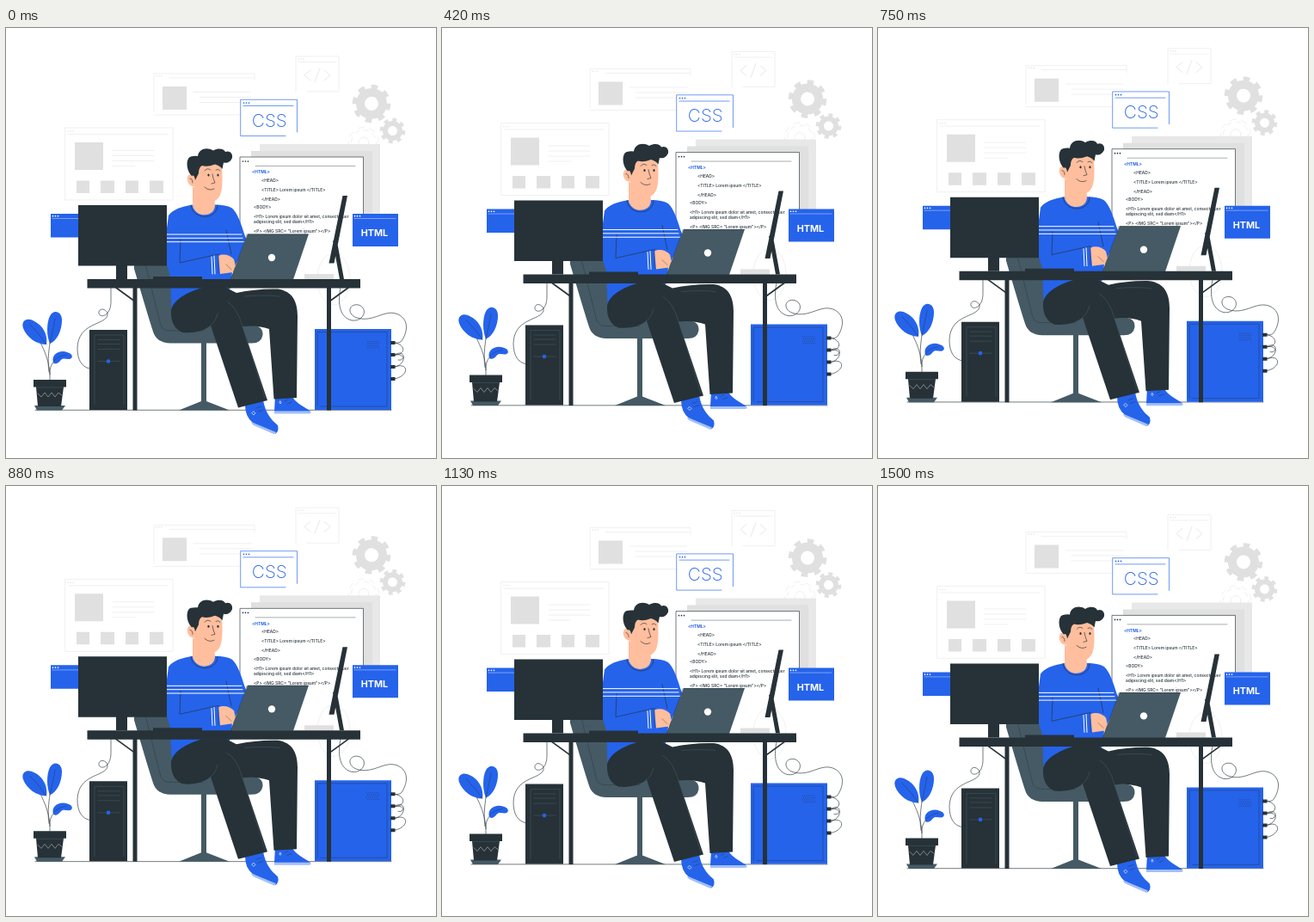
Recreate the animation shown at these times as an HTML page. Size 500 px wide and 500 px high, loop 1540 ms.

```html
<!DOCTYPE html>
<html lang="en">
<head>
<meta charset="utf-8">
<title>Developer at a desk</title>
<style>
  html, body { margin: 0; width: 100%; height: 100%; overflow: hidden; background: #fff; }
  svg { display: block; width: 100vw; height: 100vh; font-family: Inter, "Open Sans", sans-serif; }
  .blue { fill: #2563eb; }
  .dark { fill: #263238; }
  .slate { fill: #455a64; }
  .grey { fill: #e0e0e0; }
  .skin { fill: #ffbe9d; }
  .white { fill: #fff; }
  .line { fill: none; stroke: #263238; stroke-width: .65; stroke-linecap: round; stroke-linejoin: round; }
  .pale { stroke: #e8e8e8; }
  .royal { stroke: #2563eb; }
  .snow { stroke: #fff; }
  .steel { stroke: #56676f; }
  .thin { stroke-width: .4; }
  .firm { stroke-width: 1; }
  .bold { stroke-width: 1.7; }
  .dots { stroke-width: 1.7; stroke-dasharray: 0 3; }
  .code { font-size: 4.9px; font-weight: 500; fill: #263238; white-space: pre; }
</style>
</head>
<body>
<svg viewBox="0 0 500 500">
<g id="scene">
  <!-- pale windows -->
  <g class="line pale">
    <path d="M172 98V53H289V61M172 101H284M190 58H288M218 74.500H285M225 80.500H285M225 86.500H285"/>
    <path d="M69 116H194V200H69ZM72 123.500H188M124 142.500H172M124 148.500H172M124 154.500H172M124 160.500H150"/>
    <path d="M337 74V33H387V74H350M340 39.500H384"/>
    <path class="dots" d="M175 55.500H182M72 120H79M340 36H347"/>
    <path class="firm" d="M354 49L347 55L354 61M370 49L377 55L370 61M365 47L359 63"/>
  </g>
  <path class="grey" d="M182 68H210V95H182ZM80 133H113V165H80ZM82 177.500H97V192H82ZM110 177.500H126V192H110ZM139 177.500H154V192H139ZM167 177.500H183V192H167Z"/>

  <!-- gears -->
  <g fill="none" stroke="#e0e0e0">
    <g transform="rotate(10 425 88)">
      <circle cx="425" cy="88" r="13" stroke-width="10"/>
      <circle cx="425" cy="88" r="19.500" stroke-width="5.500" pathLength="8" stroke-dasharray=".5" stroke-dashoffset=".25"/>
    </g>
    <g transform="rotate(10 449.500 119.500)">
      <circle cx="449.500" cy="119.500" r="8.500" stroke-width="6"/>
      <circle cx="449.500" cy="119.500" r="12.800" stroke-width="4" pathLength="8" stroke-dasharray=".5" stroke-dashoffset=".25"/>
    </g>
  </g>
  <g class="line pale">
    <circle cx="416" cy="133" r="14.500" pathLength="8" stroke-dasharray=".5"/>
    <circle cx="416" cy="133" r="17.500" pathLength="8" stroke-dasharray=".5" stroke-dashoffset=".5"/>
    <circle cx="416" cy="133" r="6"/>
  </g>

  <!-- markup window -->
  <path fill="#e8e8e8" d="M295 135H435V250H295Z"/>
  <path class="grey" d="M285 143H426V250H285Z"/>
  <path class="white" d="M272 150H415.500V267H272Z"/>
  <path class="line" d="M272 267V150H415.500V216"/>
  <path class="line thin" d="M290 160.500H406"/>
  <path class="line dots" d="M275.500 155H283"/>
  <g class="code">
    <text x="286" y="169.500" class="blue" font-weight="700">&lt;HTML&gt;</text>
    <text x="297" y="179">&lt;HEAD&gt;</text>
    <text x="297" y="190">&lt;TITLE&gt; Lorem ipsum &lt;/TITLE&gt;</text>
    <text x="297" y="201">&lt;/HEAD&gt;</text>
    <text x="288" y="210.500">&lt;BODY&gt;</text>
    <text x="288" y="221.500">&lt;H1&gt; Lorem ipsum dolor sit amet, consectetuer</text>
    <text x="288" y="227.500">adipiscing elit, sed diam&lt;/H1&gt;</text>
    <text x="288" y="238.500">&lt;P&gt; &lt;IMG SRC= "Lorem ipsum"&gt;&lt;/P&gt;</text>
  </g>
  <ellipse class="line pale" cx="381" cy="292" rx="19" ry="30"/>
  <path class="grey" d="M347 286H381V292H347Z"/>

  <!-- small blue windows -->
  <path class="white" d="M273 83H338.500V125.500H273Z"/>
  <path class="line royal" d="M325 125.500H272.700V83.300H338.500V121M276 90.500H334"/>
  <path class="line royal dots" d="M276.500 87H283"/>
  <text class="blue" x="306.300" y="114.700" font-size="20.800" font-weight="250" text-anchor="middle">CSS</text>
  <path class="blue" d="M52 216H86V243.500H52ZM403 216H456V254H403Z"/>
  <path class="line snow thin" d="M54 221.500H84M405 221.500H453"/>
  <path class="line snow dots" d="M54.500 218.700H61M405.500 218.700H412"/>
  <text class="white" x="428.500" y="242" font-size="10.800" font-weight="700" text-anchor="middle">HTML</text>

  <path class="line" d="M34 444.300H448"/>

  <!-- plant -->
  <path class="line" d="M51 409C52 386 42 368 28 345M50 400C47 382 52 360 57 336M51 403C50 390 58 383 70 381"/>
  <g class="blue">
    <path d="M47 368C36 368 24 360 20 349C17 340 25 336 33 341C43 346 49 357 47 368Z"/>
    <path d="M51 367C47 358 47 343 51 335C55 327 65 329 65 340C65 352 59 364 51 367Z"/>
    <path d="M55 389C52 379 63 374 71 377C79 379 78 385 73 385C69 385 66 383 63 387C60 391 56 391 55 389Z"/>
  </g>
  <path class="line thin" d="M47 368Q40 357 28 345M51 367Q55 350 57 338M55 388Q60 381 70 380"/>
  <path class="slate" d="M33 439H69L65 444.500H36Z"/>
  <path class="dark" d="M32 409H70V417.500H67L64 440H37L35 417.500H32Z"/>
  <path class="line steel thin" d="M35 418H67"/>
  <path class="line snow thin" d="M37 425L41 429L45 424L49 429L53 424L57 429L61 424L65 427"/>

  <!-- towers and cables -->
  <path class="line" d="M122 302V318C122 337 107 338 108 330C110 324 119 328 118 334C115 346 84 342 83 372C83 386 88 394 97 396"/>
  <path class="dark" d="M97 351H141V444H97Z"/>
  <path class="line steel thin" d="M103 438V357H137V438M107 362.500H132M107 367.500H132M107 373.500H132M107 387.500H132"/>
  <circle class="blue" cx="119" cy="387.500" r="2.300"/>
  <path class="blue" d="M359 350H448V444H359Z"/>
  <path class="line thin" d="M362 440V353.500H443V440H366"/>
  <path class="line" stroke-dasharray="0 2.200" d="M419.500 364.500H434M420.500 367H434M419.500 369.500H434M420.500 372H434"/>
  <path class="line" d="M389 302C386 316 386 336 402 340C416 342 422 326 410 322C398 320 396 333 408 337C428 343 440 326 456 333C470 340 466 355 460 364Q457 367 452 366M452 366C465 368 465 380 452 380C466 372 466 392 452 394M452 380C465 378 463 388 456 386M452 394C468 388 470 404 452 408"/>
  <path class="dark" d="M447 364H452.500V368H447ZM447 378H452.500V382H447ZM447 392H452.500V396H447ZM447 406H452.500V410H447Z"/>

  <!-- chair -->
  <path class="slate" d="M227 364H233V434L260 444.500H201L227 434Z"/>
  <path class="slate" d="M149 274H200V346H288Q299 347 298.500 357Q297 366.500 286 366.500H191Q175 366 171 353Q166 338 149 280Z"/>
  <path class="line thin" d="M162 274L180 346Q183 352 190 352H230"/>

  <!-- sweater -->
  <path class="blue" d="M217 205.500C203 208 194 211 189 218L183 262L191 289L192.500 328H240L262 301L263 282L281 250C276 238 271 215 262 209Q256 205.500 243 205.500Z"/>
  <path class="line" d="M203 246L202 273L247 263M256 235L262 263M215 206C217 224 246 224 246 206"/>
  <path class="line snow firm" d="M187 240H274M187 244.300H275M186 248.700H277M239 266L240 286M242 265L243 286"/>
  <path class="skin" d="M247 265C253 262 261 264 265 269Q268 278 264 284L249 286Z"/>
  <path class="line thin" d="M247 264V285M256 275L262 281"/>

  <!-- shoes and legs -->
  <path class="blue" d="M278 438L299 433C302 448 308 455 316 462Q318 469 313 472L287 459Q278 452 278 438Z"/>
  <path fill="#a3bff7" d="M285 458L314 470Q313 473 311 472L288 462Q285 460 285 458ZM312 445.500H354Q356 448 352 448.500H312Z"/>
  <path class="blue" d="M313 428L332 427C336 436 345 439 354 445.500H312Z"/>
  <path class="line snow" d="M288 446L290 448L288 450L286 448ZM319 434L320 436L319 437L318 436Z"/>
  <path class="line thin" d="M291 442L297 440M293 446L299 444M324 434L328 432M327 437L332 435"/>
  <path class="dark" d="M192 328C196 314 212 307 228 302H256L268 308C284 304.500 300 303 316 303.500C333 306 339 318 339 335L338 430L311.500 431.500L306 350Q292 345 275 347L304 433L270 441.500L238 346Q225 356 205 354Q191 348 192 328Z"/>
  <path class="line steel thin" d="M257 318Q269 324 276 350L301 430M278 312Q300 310 318 312M238 346Q244 341 246 332"/>

  <!-- head -->
  <path class="skin" d="M217 184V207C221 222 244 220 243 205L242 197Z"/>
  <path class="skin" d="M222 154H250C252 168 252 184 250 191C247 203 237 204 229 199Q221 194 219 184C211 185 208 172 214 170Q220 169 221 174Z"/>
  <path class="dark" d="M216 172C209 165 209 151 215 149.500Q219 148.500 223 149C224 140 234 138 241 142.500C248 138.500 254 141 255 144C260 142 264 146 263 151Q260 158 253 156.500L251.500 164Q249 160 243 158.500Q234 162 228 160Q224 162 224 169L220 177Q219 170 216 172Z"/>
  <path class="line" d="M231 166Q234 162 238 165M244 165Q247 163 249 166M240 170Q241 176 243 180L239 181M231 185Q236 190 242 187M214 175Q217 175 217 180"/>
  <g class="dark"><ellipse cx="235.500" cy="171" rx="1.100" ry="1.500"/><ellipse cx="246.500" cy="171" rx="1.100" ry="1.500"/></g>

  <!-- desk -->
  <path class="dark" d="M84 206H187V276.500H141V292H128V276.500H84ZM171 289H228V293H171Z"/>
  <path class="slate" d="M281 239.500H352L334 292.500H261Z"/>
  <path class="line thin" d="M280 240L261.500 292M281 240H351"/>
  <circle class="white" cx="309" cy="267" r="4.200"/>
  <path class="dark" d="M391.500 195H397L381.500 273.500H375.500ZM380 248L384 243L393 292H388Z"/>
  <path class="dark" d="M94.500 292H412V302.500H94.500ZM147.500 302H152.500V444.500H147.500ZM373 302H378V444.500H373Z"/>
  <path class="line bold" d="M128 302L150 318M398 302L376 318"/>
</g>
</svg>
<script>
  const PERIOD = 1540, TOP_TIME = 735, RISE = 10;
  const scene = document.getElementById("scene");

  // Linear float: the whole scene rises to TOP_TIME, then sinks back.
  function lift(ms) {
    const away = Math.abs(ms % PERIOD - TOP_TIME);
    return RISE * (1 - Math.min(away, PERIOD - away) / (PERIOD / 2));
  }

  const start = performance.now();
  function draw() {
    const y = lift(0) - lift(performance.now() - start);
    scene.setAttribute("transform", `translate(0 ${y.toFixed(3)})`);
    requestAnimationFrame(draw);
  }
  draw();
</script>
</body>
</html>
```
